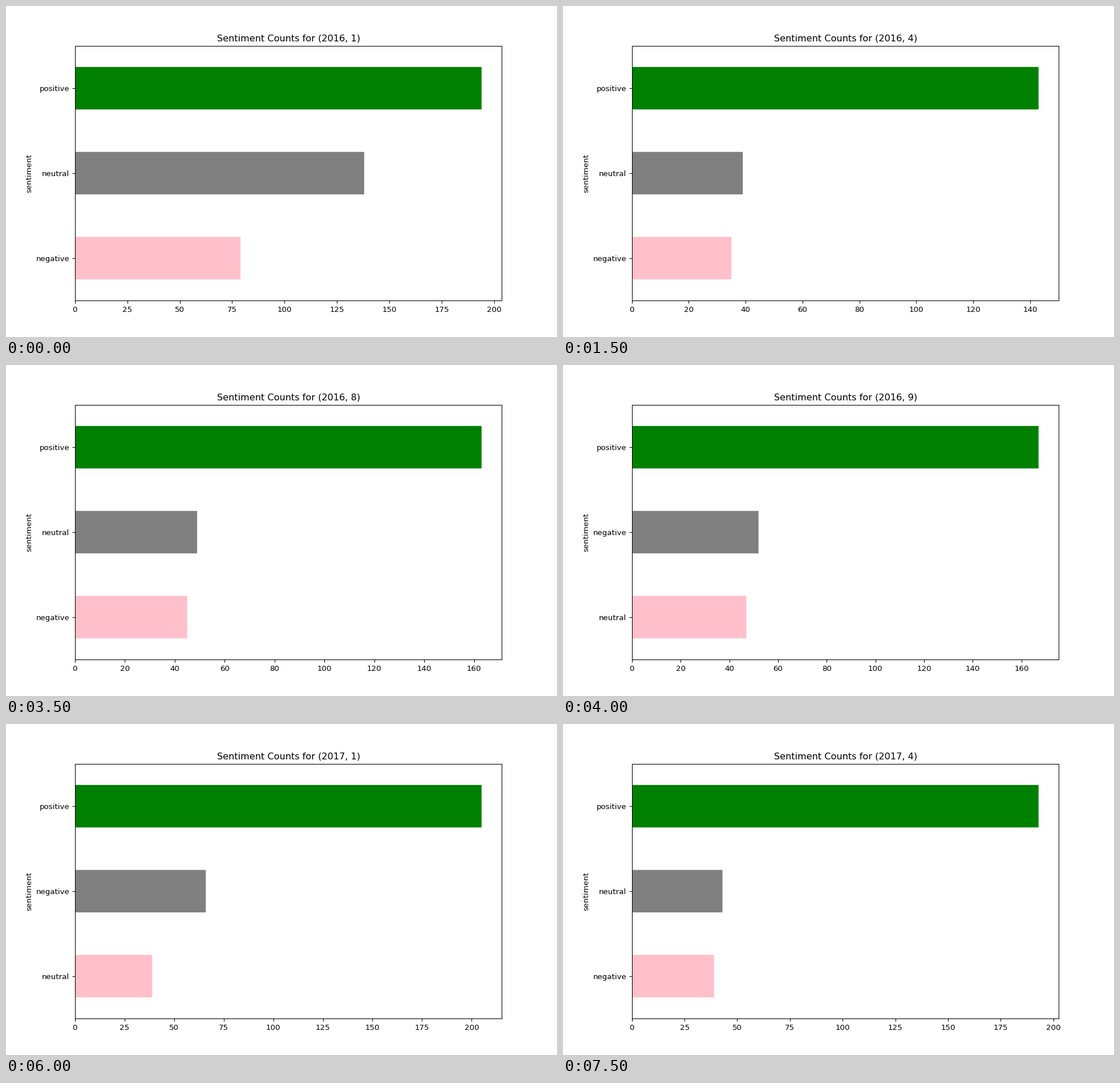
A matplotlib script that plays this animation: 966x580 px, repeating every 8000 ms.

```python
import matplotlib.pyplot as plt
from matplotlib.animation import FuncAnimation

DPI = 96.6
COLORS = ["pink", "gray", "green"]

# One row per month from January 2016: counts from the top bar down,
# then whether "negative" outranks "neutral".
MONTHS = [
    (194, 138, 79, False),
    (193, 98, 58, False),
    (141, 52, 42, False),
    (143, 39, 35, False),
    (128, 40, 36, False),
    (140, 42, 39, False),
    (148, 45, 41, False),
    (163, 49, 45, False),
    (167, 52, 47, True),
    (145, 45, 39, True),
    (160, 39, 31, True),
    (159, 46, 41, False),
    (205, 66, 39, True),
    (195, 52, 46, False),
    (185, 50, 42, True),
    (193, 43, 39, False),
]

plt.rcParams["font.family"] = "DejaVu Sans"
# The tiny excess keeps float rounding from dropping a pixel.
fig, ax = plt.subplots(figsize=(966.001 / DPI, 580.001 / DPI), dpi=DPI)


def draw(i):
    top, mid, low, negative_first = MONTHS[i]
    labels = ["negative", "neutral", "positive"]
    if negative_first:
        labels[:2] = labels[1::-1]

    ax.clear()
    ax.barh(range(3), [low, mid, top], height=0.5, color=COLORS, snap=False)
    ax.set_yticks(range(3), labels)
    ax.set_ylim(-0.5, 2.5)
    ax.set_xlim(0, top * 1.05)
    ax.set_ylabel("sentiment")
    ax.set_title(f"Sentiment Counts for ({2016 + i // 12}, {i % 12 + 1})")
    return ax.patches


anim = FuncAnimation(fig, draw, frames=len(MONTHS), init_func=lambda: draw(0),
                     interval=500, repeat=True, repeat_delay=0)
plt.show()
```
